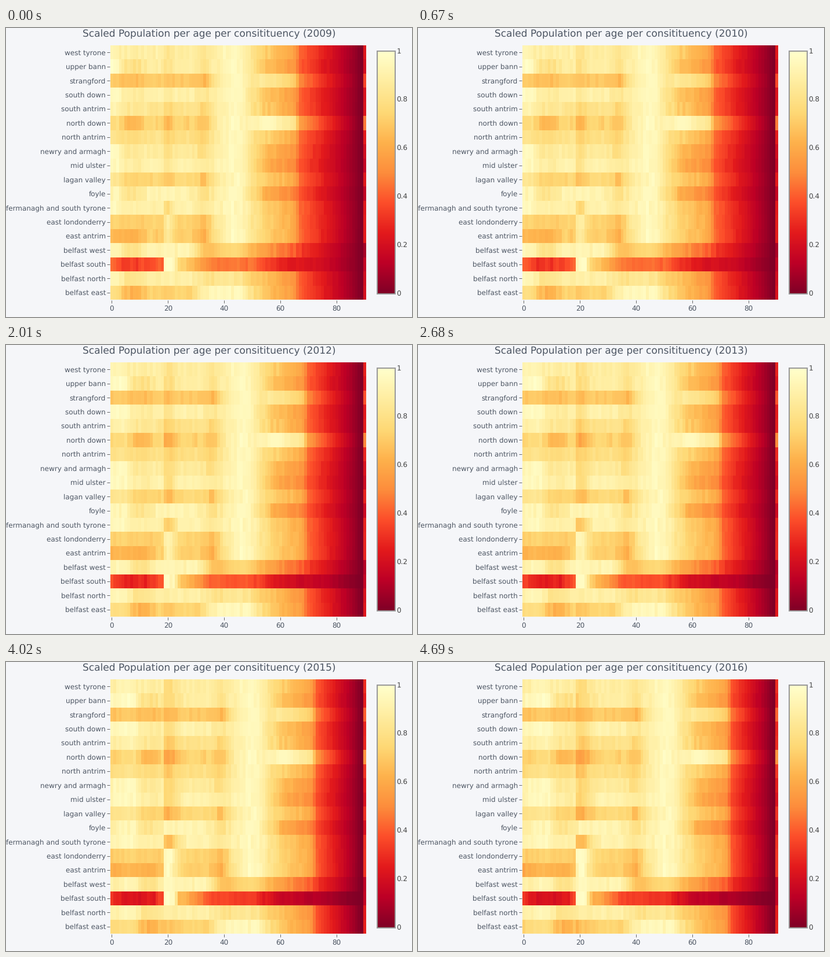
Animation, 700 px wide and 500 px high, one loop 7.37 s. Source, as a matplotlib script:

```python
import numpy as np
import matplotlib.pyplot as plt
from matplotlib.animation import FuncAnimation
from matplotlib.patches import Rectangle

W, H, DPI = 700, 500, 100
PX = 72 / DPI
LEFT, RIGHT, TOP, BOTTOM = 180, 621, 30, 470
FIRST_YEAR, LAST_STEP = 2009, 7
INK = "#4D5663"

plt.rcParams["font.family"] = "DejaVu Sans"
plt.rcParams["text.hinting"] = "none"

AGES = np.arange(91)
CELL = (RIGHT - LEFT) / len(AGES)


def campus(step):
    """The university district keeps its shape by age and darkens each year."""
    ages = [0, 5, 14, 18, 19, 22, 24, 30, 35, 50, 60, 76, 89]
    levels = [43, 33, 35, 45, 98, 97, 76, 62, 48, 45, 27, 18, 0]
    values = 100 * (np.interp(AGES, ages, levels) / 100) ** (1 + 0.06 * step)
    values[90] = 15
    return values


def town(young, school, adult, sixties, students=-7, thirties=None, prime=94):
    """Percent levels by birth cohort; the curve moves one age up each year."""
    thirties = thirties or adult - 7
    senior = 0.5 * sixties + 11
    oldest = 0.6 * (sixties + senior) - 40
    curve = {-7: young - 4, -1: young + 1, 2: young, 5: school, 9: school,
             13: adult, 28: adult, 33: thirties, 37: (thirties + 2 * prime) / 3,
             43: prime + 2, 46: prime, 51: (prime + sixties) / 2 + 1,
             55: sixties + 8, 61: sixties, 66: sixties - 7}

    def values_at(step):
        cohort = AGES - step
        values = np.interp(cohort, list(curve), list(curve.values()))

        # Students leave or arrive at 19; the effect grows and spreads.
        spread = np.exp(-((AGES - 20) / (2 + 0.3 * step)) ** 2)
        values += students * (1 + 0.12 * step) * spread * (AGES >= 19)

        decline = senior * (89 - AGES) / 22 * (1 + 0.05 * step)
        values += (decline - values) * np.clip((cohort - 65) / 2, 0, 1)
        values[90] = oldest + step
        return values

    return values_at


PLACES = {
    "west tyrone": town(92, 87, 89, 63),
    "upper bann": town(96, 80, 88, 59),
    "strangford": town(70, 66, 71, 76, students=-4),
    "south down": town(96, 88, 90, 61),
    "south antrim": town(91, 84, 82, 62),
    "north down": town(76, 66, 74, 88, students=-10),
    "north antrim": town(81, 78, 80, 65),
    "newry and armagh": town(95, 85, 86, 58),
    "mid ulster": town(96, 89, 92, 54, students=-10),
    "lagan valley": town(83, 73, 75, 64),
    "foyle": town(92, 83, 92, 53, students=0, thirties=79),
    "fermanagh and south tyrone": town(95, 89, 91, 64, students=-14),
    "east londonderry": town(74, 72, 73, 65, students=14),
    "east antrim": town(63, 63, 71, 65, students=14, thirties=60),
    "belfast west": town(92, 81, 92, 46, students=2, thirties=65, prime=74),
    "belfast south": campus,
    "belfast north": town(93, 82, 89, 58, students=0, prime=82),
    "belfast east": town(78, 62, 74, 60, students=-3, thirties=92),
}

# One small deviation per place and cohort, carried along as it ages.
JITTER = np.random.default_rng(9).normal(0, 1.5, (len(PLACES), len(AGES) + LAST_STEP))


def grid(step):
    rows = np.array([values_at(step) for values_at in PLACES.values()])
    fade = np.clip((89 - AGES) / 30, 0, 1)
    rows += JITTER[:, AGES - step + LAST_STEP] * fade
    return np.clip(rows / 100, 0, 1)


fig = plt.figure(figsize=(W / DPI, H / DPI), dpi=DPI, facecolor="#F5F6F9")
ax = fig.add_axes([0, 0, 1, 1])


def label(x, y, text, size=12, ha="center", color=INK):
    return ax.text(x, y, text, fontsize=size * PX, ha=ha, va="baseline", color=color)


def tick(x, y, dx, dy):
    ax.plot([x, x + dx], [y, y + dy], color="#666666", lw=PX, solid_capstyle="butt")


scale = dict(cmap="YlOrRd_r", vmin=0, vmax=1, aspect="auto", interpolation="nearest")
heat = ax.imshow(grid(0), extent=(LEFT, RIGHT, BOTTOM, TOP), **scale)
ax.imshow(np.linspace(1, 0, 420)[:, None], extent=(641, 670, 460, 40), **scale)
ax.add_patch(Rectangle((640, 40), 31, 420, fill=False, ec="#999999", lw=2 * PX))

row_height = (BOTTOM - TOP) / len(PLACES)
for i, name in enumerate(PLACES):
    y = TOP + (i + 0.5) * row_height
    label(172, y + 4, name, ha="right")
    tick(LEFT - 6, y, 5, 0)
for age in range(0, 81, 20):
    x = LEFT + (age + 0.5) * CELL
    label(x, 490, str(age))
    tick(x, BOTTOM + 1, 0, 5)
for k in range(6):
    label(673.5, 464 - 84 * k, f"{k / 5:g}", ha="left", color="#444444")

title = label(350, 15, "", size=17)
ax.set(xlim=(0, W), ylim=(H, 0))
ax.axis("off")


def update(frame):
    step = min(frame, LAST_STEP)
    heat.set_data(grid(step))
    title.set_text(f"Scaled Population per age per consitituency ({FIRST_YEAR + step})")
    return heat, title


anim = FuncAnimation(fig, update, frames=11, interval=670, repeat=True, repeat_delay=0)
plt.show()
```
